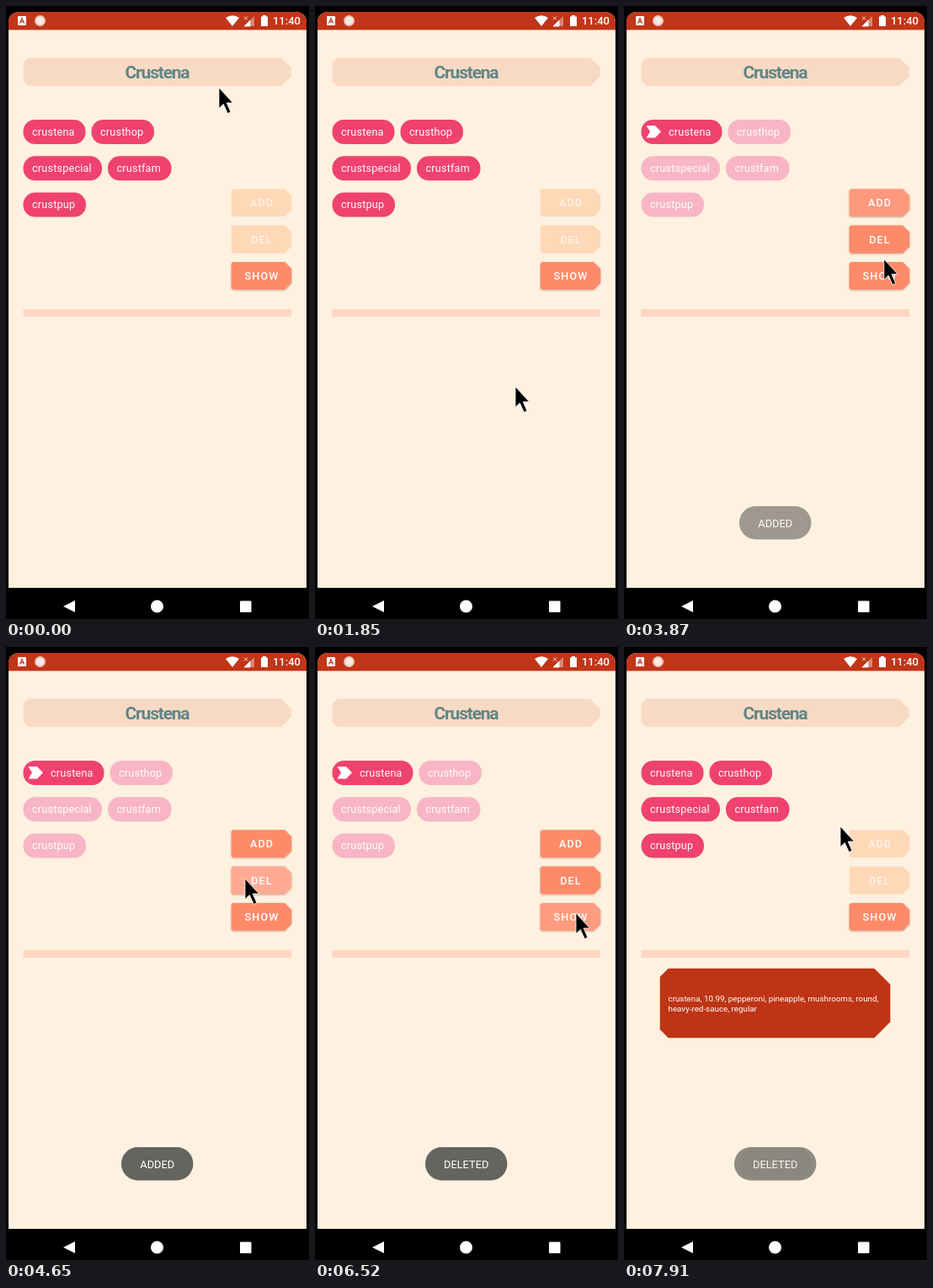
Animation of 360 by 728 pixels, one loop 7990 ms. Source, as an HTML page:

```html
<!DOCTYPE html>
<html lang="en">
<head>
<meta charset="utf-8">
<title>Order screen</title>
<style>
  html, body { margin: 0; width: 100%; height: 100%; overflow: hidden; background: #000; }
  svg { display: block; width: 360px; height: 728px; font-family: Roboto, sans-serif; }
  text { fill: #fff; }
  .title { font-size: 21px; font-weight: 600; letter-spacing: -1.2px; fill: #5f8687; }
  .chip { font-size: 12.6px; letter-spacing: .22px; }
  .button { font-size: 12.6px; font-weight: 500; letter-spacing: 1.12px; }
  .raised { filter: drop-shadow(0 1.4px 1px rgba(90, 50, 30, .35)); }
  .card { font-size: 9.8px; }
  .toast { font-size: 12.8px; }
</style>
</head>
<body>
<svg id="stage" viewBox="0 0 360 728">
  <clipPath id="screen"><rect x="3" y="7" width="354" height="740" rx="12"/></clipPath>
  <g clip-path="url(#screen)">
    <rect width="360" height="691" fill="#fff1df"/>
    <rect width="360" height="28.4" fill="#c13518"/>
  </g>
  <g fill="#fff">
    <rect x="14" y="12" width="10" height="11" rx="1"/>
    <path d="M16.5 20.5L19 14.5L21.5 20.5M17.4 18.7H20.6" fill="none" stroke="#c13518" stroke-width="1.2"/>
    <circle cx="40.5" cy="17.5" r="5.5" fill="#fbe9e3" stroke="#f1c5b9" stroke-width="2"/>
    <path d="M261 14Q269 8.5 277 14L269 24Z"/>
    <path d="M283 24L295 12V24Z" opacity=".4"/>
    <path d="M283 24L290 17V24ZM283 12.5L287 16.5M287 12.5L283 16.5" stroke="#fff" stroke-width=".8"/>
    <path d="M303 12.5H305V11H309V12.5H311V24H303Z"/>
    <path d="M68 713L82 706V720Z"/>
    <circle cx="179.500" cy="713" r="7.500"/>
    <rect x="278" y="706.500" width="13.500" height="13.500" rx="1"/>
  </g>
  <text x="350" y="22" text-anchor="end" font-size="13" font-weight="500">11:40</text>
</svg>
<script>
const LOOP = 7990;
const stage = document.getElementById('stage');

function set(el, attrs) {
  for (const k in attrs) el.setAttribute(k, attrs[k]);
}
function add(parent, tag, attrs, content = '') {
  const el = document.createElementNS('http://www.w3.org/2000/svg', tag);
  set(el, attrs);
  el.textContent = content;
  return parent.appendChild(el);
}
const group = cls => add(stage, 'g', { class: cls });

// Box with cut corners: size a on the left, b on the right
const cut = (x, y, w, h, a, b) =>
  `M${x} ${y + a}l${a} ${-a}H${x + w - b}l${b} ${b}V${y + h - b}l${-b} ${b}H${x + a}l${-a} ${-a}Z`;

add(stage, 'path', { d: cut(20.5, 61.5, 318.5, 33.5, 6, 12), fill: '#f8dac4' });
add(stage, 'text', { x: 179.5, y: 85.5, class: 'title', 'text-anchor': 'middle' }, 'Crustena');
add(stage, 'rect', { x: 20.5, y: 360, width: 318.5, height: 9, fill: '#ffd5c3' });

const chipRows = [
  [['crustena', 74], ['crusthop', 74.5]],
  [['crustspecial', 93.5], ['crustfam', 75.5]],
  [['crustpup', 74.5]]
].map((row, r) => row.map(([name, w]) => {
  const g = group('chip');
  const y = 135 + 43.3 * r;
  const box = add(g, 'rect', { y, height: 29, rx: 14 });
  const label = add(g, 'text', { y: y + 18.6 }, name);
  return { g, box, label, w };
}));
const first = chipRows[0][0];
const arrow = add(first.g, 'path', { d: 'M6 142H16.5L23.5 149.3L16.5 156.5H6L10.5 149.3Z', fill: '#fff' });

const buttons = ['ADD', 'DEL', 'SHOW'].map((name, i) => {
  const g = group('button');
  const y = 217.3 + 43.3 * i;
  const d = cut(267.7, y, 71.5, 32.8, 2, 8);
  const box = add(g, 'path', { d });
  const glow = add(g, 'path', { d, fill: '#fff' });
  const label = add(g, 'text', { x: 304, y: y + 21, 'text-anchor': 'middle' }, name);
  return { name, g, box, label, glow };
});

const card = group('card');
add(card, 'path', { d: cut(42.7, 381.7, 273.7, 82.5, 10, 19), fill: '#be3415' });
add(card, 'text', { x: 52.5, y: 421.3 }, 'crustena, 10.99, pepperoni, pineapple, mushrooms, round,');
add(card, 'text', { x: 52.5, y: 432.8 }, 'heavy-red-sauce, regular');

const [deleted, added] = [['DELETED', 97.5], ['ADDED', 85.5]].map(([name, w]) => {
  const g = group('toast');
  add(g, 'rect', { x: 179.7 - w / 2, y: 594, width: w, height: 39.5, rx: 19.7, fill: '#646460' });
  add(g, 'text', { x: 179.7, y: 618.8, 'text-anchor': 'middle' }, name);
  return g;
});

const cursor = add(stage, 'path', {
  d: 'M0 0V24.5L5.3 19.5L10.3 30.5L14 29L9.2 18H16.5Z', stroke: '#fff', 'stroke-width': .8
});
const tap = add(stage, 'circle', { r: 18, fill: '#ffe100', 'fill-opacity': .5 });

// The pointer wanders through free points and taps named places
const places = { CHIP: [66, 147], ADD: [304, 236], DEL: [284, 275], SHOW: [310, 316] };
const route = [
  [70, [253, 97]], [460, [140, 42]], [850, [150, 141]], [1150, [74, 190]], [1600, [290, 310]],
  [1850, [238, 452]], [2130, [160, 558]], [2540, [92, 169]],
  [2740, 'CHIP'], [3090, [170, 196]], [3560, 'ADD'], [3960, 'SHOW'], [4500, 'DEL'],
  [5180, 'SHOW'], [5480, 'ADD'], [5800, 'SHOW'], [6030, 'DEL'], [6220, 'SHOW'],
  [7270, 'CHIP'], [7910, [257, 213]]
];
const MOVE = 320; // time to leave a tapped place for the next stop

const ramp = (t, from, to) => Math.min(1, Math.max(0, (t - from) / (to - from)));
const tapsOf = (name, t) => route.filter(([at, stop]) => stop === name && at <= t);
const lastTap = (name, t) => (tapsOf(name, t).pop() ?? [-Infinity])[0];
const point = stop => places[stop] ?? stop;

function pointer(t) {
  const i = route.findIndex(([at]) => at > t);
  if (i < 1) return point(route.at(i)[1]);
  const [t0, from] = route[i - 1], [t1, to] = route[i];
  const leave = places[from] ? Math.max(t0, t1 - MOVE) : t0;
  const u = ramp(t, leave, t1), ease = u * u * (3 - 2 * u);
  const a = point(from), b = point(to);
  return a.map((v, k) => v + (b[k] - v) * ease);
}

function draw(t) {
  const picked = tapsOf('CHIP', t - 60).length % 2 === 1;
  for (const row of chipRows) {
    let x = 20.5;
    for (const c of row) {
      const main = picked && c === first;
      const indent = main ? 22 : 0;
      set(c.g, { transform: `translate(${x} 0)` });
      set(c.box, { width: c.w + indent, fill: picked && !main ? '#f8b5c6' : '#ef426f' });
      set(c.label, { x: 10.5 + indent });
      x += c.w + indent + 7;
    }
  }
  set(arrow, { opacity: picked ? ramp(t, 2950, 3450) : 0 });

  for (const b of buttons) {
    const on = picked || b.name === 'SHOW';
    const age = t - lastTap(b.name, t);
    set(b.g, { class: on ? 'button raised' : 'button' });
    set(b.box, { fill: on ? '#ff8a6a' : '#ffd8b8' });
    set(b.label, { opacity: on ? 1 : .7 });
    set(b.glow, { opacity: .42 * ramp(age, 40, 120) * (1 - ramp(age, 0, 450)) });
  }

  const shown = lastTap('SHOW', t - 380) > lastTap('DEL', t - 80);
  set(card, { opacity: shown ? 1 : 0 });

  const swap = ramp(t, 5780, 6030), back = ramp(t, 7840, 8090);
  set(added, { opacity: ramp(t, 3720, 3960) * (1 - swap) + back * back });
  set(deleted, { opacity: swap * swap * (1 - back) });

  const transform = `translate(${pointer(t)})`;
  const tapped = Object.keys(places).some(name => t - lastTap(name, t) < 110);
  set(cursor, { transform });
  set(tap, { transform, opacity: tapped ? 1 : 0 });
}

let start;
function tick(now) {
  start ??= now;
  draw((now - start) % LOOP);
  requestAnimationFrame(tick);
}
draw(0);
requestAnimationFrame(tick);
</script>
</body>
</html>
```
